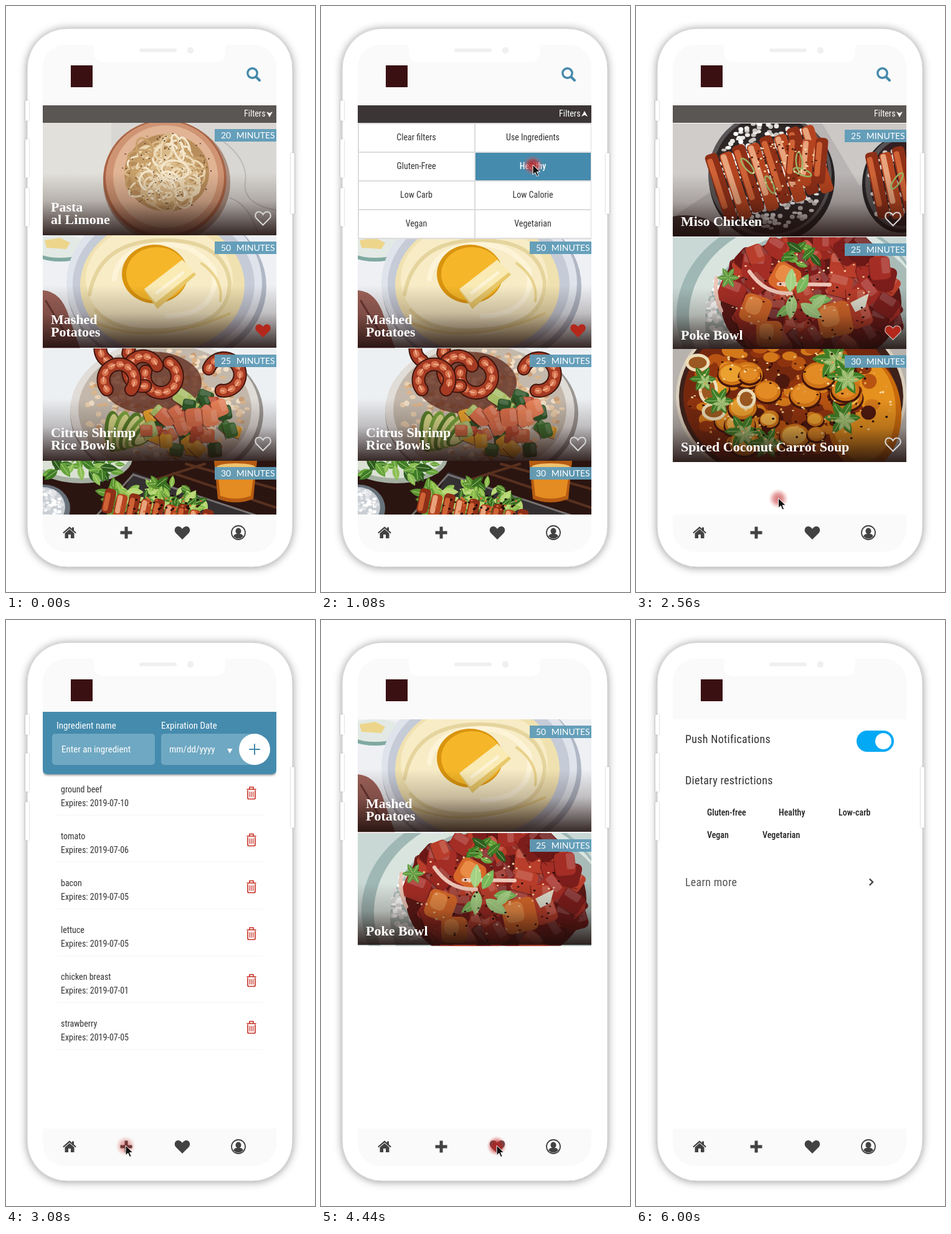
Animation, 496 px wide and 938 px high, one loop 6.32 s. Source, as an HTML page:

```html
<!DOCTYPE html>
<html lang="en">
<head>
<meta charset="utf-8">
<title>Recipe app</title>
<style>
html, body { margin: 0; width: 100%; height: 100%; overflow: hidden; background: #fff; }
svg { display: block; width: 496px; height: 938px; }
text { font: 14px "Roboto Condensed", Roboto, "Liberation Sans Narrow", sans-serif; font-stretch: 75%; fill: #333; }
.title { font: bold 22px "Liberation Serif", Times, serif; fill: #fff; }
.tag { font: 14px Lato, sans-serif; word-spacing: 5px; fill: #fff; }
.mid { text-anchor: middle; }
.white { fill: #fff; }
.field { font-size: 15px; fill: #fff; }
.big { font-size: 18px; letter-spacing: .3px; }
.chip { font-weight: 500; fill: #222; }
</style>
</head>
<body>
<svg id="stage" viewBox="0 0 496 938"></svg>
<script>
const LOOP = 6320, STEP = 40;

// Shape helpers
const el = (x, y, rx, ry, fill, more = '') =>
  `<ellipse cx="${x}" cy="${y}" rx="${rx}" ry="${ry}" fill="${fill}" ${more}/>`;
const box = (x, y, w, h, fill, more = '') =>
  `<rect x="${x}" y="${y}" width="${w}" height="${h}" fill="${fill}" ${more}/>`;
const path = (d, fill, more = '') => `<path d="${d}" fill="${fill}" ${more}/>`;
const line = (d, color, w, more = '') =>
  path(d, 'none', `stroke="${color}" stroke-width="${w}" stroke-linecap="round" ${more}`);
const text = (x, y, s, cls = '', more = '') => `<text x="${x}" y="${y}" class="${cls}" ${more}>${s}</text>`;
const at = (x, y, body, turn = 0) => `<g transform="translate(${x} ${y}) rotate(${turn})">${body}</g>`;
const group = (id, body) => `<g id="${id}">${body}</g>`;

function random(seed) {
  return () => (seed = (seed * 16807) % 2147483647) / 2147483647;
}

// Places n parts at random inside an ellipse.
function scatter(seed, n, cx, cy, rx, ry, draw) {
  const rnd = random(seed * 7919);
  let out = '';
  for (let i = 0; i < n; i++) {
    const a = rnd() * 2 * Math.PI, d = Math.sqrt(rnd());
    out += draw(+(cx + rx * d * Math.cos(a)).toFixed(1), +(cy + ry * d * Math.sin(a)).toFixed(1), rnd);
  }
  return out;
}
const pick = (list, rnd) => list[Math.floor(rnd() * list.length)];
const dots = (seed, n, cx, cy, rx, ry, colors, size) =>
  scatter(seed, n, cx, cy, rx, ry, (x, y, r) => el(x, y, size, size * (.5 + r() / 2), pick(colors, r)));
const cubes = (seed, n, cx, cy, rx, ry, colors, size) =>
  scatter(seed, n, cx, cy, rx, ry, (x, y, r) => {
    const s = size * (.7 + r() * .5);
    return at(x, y, box(-s / 2, -s / 2, s, s * .9, pick(colors, r), `rx="${s / 5}"`) +
      box(-s / 2 + 2, -s / 2 + 1, s * .7, s * .35, '#fff', 'rx="3" opacity=".16"') +
      line(`M${-s / 2} ${s * .42}H${s / 2}`, '#40100c', 1.5, 'opacity=".5"'), Math.floor(r() * 90));
  });
const leaf = (x, y, len, turn, fill) =>
  at(x, y, path(`M0 0Q${len * .4} ${-len * .45} ${len} 0Q${len * .4} ${len * .45} 0 0`, fill) +
    line(`M2 0H${len * .8}`, '#d3e5a8', .7), turn);
const sprig = (x, y, len, fill) => {
  let out = '';
  for (let a = 0; a < 360; a += 60) out += leaf(x, y, len, a, fill);
  return out;
};
const leaves = (seed, n, cx, cy, rx, ry, len, colors) =>
  scatter(seed, n, cx, cy, rx, ry, (x, y, r) => leaf(x, y, len * (.6 + r() * .6), Math.floor(r() * 360), pick(colors, r)));
const shrimp = (x, y, r, turn) => {
  const d = `M${r} 0A${r} ${r} 0 1 1 ${-r * .2} ${r}`;
  return at(x, y, line(d, '#3f150e', 22) + line(d, '#a63a23', 18) +
    line(d, '#d8754f', 10, 'stroke-dasharray="2 12"') + line(d, '#efb394', 2, 'stroke-dasharray="7 7"'), turn);
};
const strips = (x, y, n, w, h, turn) => {
  let out = '';
  for (let i = 0; i < n; i++) {
    const sx = (i - n / 2) * w;
    out += box(sx, -h / 2 + (i % 2) * 5, w - 2, h, i % 2 ? '#b4441f' : '#8e2f17', 'rx="6"') +
      box(sx + 2, -h / 2 + 7, w * .4, h * .75, i % 2 ? '#e8a37c' : '#cf6336', 'rx="4"');
  }
  return at(x, y, out, turn);
};

// Food pictures, each 375 by 180
const greens = ['#3f7d26', '#65a33a', '#2d5c20', '#8cbf55'];
const food = {};

food.pasta = box(0, 0, 375, 181, '#d9d7d3') + box(0, 0, 110, 181, '#e2e0da') +
  line('M290 30Q330 60 325 95T375 140M300 120Q330 130 345 175', '#a9a8a8', 2, 'opacity=".6"') +
  el(199, 95, 102, 97, '#7d4a33', 'opacity=".5"') + el(196, 90, 99, 95, '#a96445') + el(196, 88, 95, 91, '#cf9473') +
  el(197, 86, 84, 82, '#e0b494') + el(199, 80, 68, 62, '#b98d5b') +
  scatter(3, 105, 199, 79, 53, 48, (x, y, r) =>
    el(x, y, 8 + r() * 17, 5 + r() * 11, 'none',
      `stroke="${pick(['#ecd8b4', '#d9b989', '#f4e7cd', '#c7a06a'], r)}" stroke-width="3.2" transform="rotate(${Math.floor(r() * 180)} ${x} ${y})"`)) +
  dots(5, 80, 199, 79, 75, 66, ['#4b3526', '#6b4c31'], 1.2);

food.mash = box(0, 0, 375, 181, '#eef0f4') + el(28, 22, 48, 20, '#7fa9a1') + el(28, 18, 46, 18, '#e3eae5') +
  path('M3 8L28 4L44 12L38 22L6 20Z', '#edd58b') + path('M0 88Q30 90 42 130L60 181H0Z', '#9d6259') +
  line('M5 105L38 160', '#6a3632', 3) +
  el(199, 82, 160, 132, '#b0b7c5') + el(195, 76, 157, 130, '#dfe3eb') + el(194, 78, 146, 119, '#c5cbd7') +
  el(192, 80, 132, 108, '#f0e1b0') + el(187, 70, 118, 90, '#f7ecc6') +
  line('M75 95Q90 10 190 8T300 75Q300 140 210 150T85 120', '#e2cf94', 6, 'opacity=".8"') +
  line('M115 70Q120 25 180 16T275 55Q285 125 200 130', '#fff7de', 8, 'opacity=".8"') +
  line('M85 140Q180 180 300 125M255 45Q290 70 285 105', '#e5cb7d', 4, 'opacity=".8"') +
  el(180, 62, 53, 47, '#d9940f') + el(183, 62, 49, 43, '#f5b729') +
  path('M163 88L224 40L246 63L184 118Z', '#e8c869') + path('M163 86L224 39L243 59L181 108Z', '#faeab4') +
  line('M183 92L225 60', '#fff9e5', 5, 'opacity=".7"');

const slice = i => at(112 + i * 14, 133,
  el(0, 0, 13, 33, i % 2 ? '#78a63c' : '#557f29') + el(2, 0, 9, 28, '#d9dc8b'), i * 12);
food.bowl = box(0, 0, 375, 181, '#edf0f3') + el(199, 104, 155, 116, '#9b9793') + el(196, 100, 152, 114, '#e0dcd7') +
  el(196, 98, 139, 104, '#c3b8ab') +
  dots(11, 420, 196, 94, 132, 92, ['#e9cfae', '#f1dfc7', '#c99e78', '#dcb48b'], 4.6) +
  el(175, 55, 80, 50, '#5b2517', 'opacity=".75"') + [0, 1, 2, 3, 4].map(slice).join('') +
  cubes(13, 44, 240, 122, 78, 46, ['#d36a42', '#bd4a30', '#e8a22c', '#3d7030', '#2d5528', '#a8bd66'], 22) +
  cubes(15, 9, 240, 105, 56, 25, ['#d96e4b', '#e78157'], 27) +
  shrimp(125, 28, 23, 200) + shrimp(179, 14, 26, 20) + shrimp(187, 52, 24, 160) +
  shrimp(122, 82, 25, 220) + shrimp(262, 58, 26, 280);

food.wrap = box(0, 0, 375, 181, '#2b1511') +
  line('M210 20L375 75M230 5L375 45M150 40L260 5', '#57301f', 4) +
  path('M65 181L145 18L375 100V181Z', '#343032') + line('M80 95L145 22L375 98', '#777272', 3) +
  el(62, -4, 82, 40, '#a4afa2') + el(62, -8, 77, 36, '#dbe1d4') +
  leaves(17, 60, 66, 2, 58, 22, 24, greens) +
  el(2, 76, 42, 38, '#67717a') + el(0, 74, 36, 32, '#c9ced4') + dots(18, 130, 0, 72, 32, 29, ['#fff', '#e1e3e6'], 3) +
  leaves(19, 100, 185, 62, 80, 26, 24, ['#8abd48', '#5c9430', '#b6d672', '#38701f']) +
  strips(195, 83, 10, 20, 40, 12) + dots(20, 60, 195, 75, 70, 20, ['#1f0b07', '#d86a37'], 2) +
  path('M275 0H344L338 61Q310 72 281 61Z', '#b55b13') + path('M280 12H340L334 56Q310 65 285 56Z', '#e48b22') +
  el(310, 10, 31, 6, '#f1c26d');

const onion = (x, y, turn) => at(x, y, el(0, 0, 15, 5, 'none', 'stroke="#9ab565" stroke-width="2.5"'), turn);
food.miso = box(0, 0, 375, 182, '#b9b5b4') + path('M0 0H95L60 110L0 150Z', '#cfccca') +
  path('M240 0H375V40L300 100Z', '#cbc8c6') + el(20, 175, 55, 28, '#443634') +
  el(159, 88, 101, 103, '#242224') + el(156, 82, 99, 100, '#5a5657') + el(157, 82, 93, 95, '#2d2627') +
  dots(23, 360, 157, 82, 88, 88, ['#e9e7e3', '#c8c3bf', '#fff'], 4) +
  strips(155, 77, 8, 23, 112, -18) + strips(216, 58, 3, 22, 74, 5) +
  el(366, 98, 62, 77, '#242224') + el(367, 95, 58, 74, '#575355') + el(369, 95, 52, 69, '#332022') +
  dots(24, 80, 350, 100, 36, 58, ['#e9e7e3', '#c8c3bf'], 4) + strips(362, 92, 4, 22, 108, -12) +
  onion(120, 68, 50) + onion(156, 98, 65) + onion(203, 62, 85) + onion(208, 78, 20) + onion(360, 92, -55) +
  dots(25, 70, 175, 73, 60, 45, ['#f2d5a4', '#541c0e'], 1.8);

const salmon = (x, y, s, turn) => at(x, y, box(-s / 2, -s / 2, s, s, '#d76829', 'rx="10"') +
  box(-s / 2 + 5, -s / 2 + 4, s * .55, s * .6, '#ef9850', 'rx="9" opacity=".75"'), turn);
food.poke = box(0, 0, 375, 181, '#c9d8d5') + el(205, 125, 199, 165, '#9fb8b5') + el(214, 127, 188, 158, '#d9e4df') +
  el(230, 135, 178, 146, '#a9bbb7') + dots(30, 160, 90, 115, 36, 55, ['#fff', '#dcdedb'], 4) +
  el(222, 105, 145, 108, '#5b1815') +
  cubes(31, 120, 224, 94, 140, 96, ['#97281f', '#7c1d1b', '#b83d2a', '#6b1817', '#a42d25'], 39) +
  salmon(133, 116, 46, 20) + salmon(180, 65, 44, 30) + salmon(260, 132, 54, -12) + salmon(155, 155, 42, 0) +
  line('M123 55Q148 92 190 90M170 75L252 76M70 65Q66 95 78 118', '#ecc5b6', 6) +
  path('M285 105L315 90L309 112L293 120Z', '#dfe2d3') +
  leaves(32, 13, 202, 26, 28, 18, 25, greens) + leaf(188, 88, 39, -85, '#a4d285') + leaf(200, 90, 36, -60, '#79b85c') +
  leaf(194, 108, 34, 145, '#79b85c') + leaf(205, 106, 42, 35, '#a4d285') + leaf(218, 100, 38, 0, '#79b85c') +
  leaf(222, 116, 34, -45, '#a4d285') + leaf(192, 92, 40, 95, '#a4d285') +
  sprig(89, 65, 18, '#5e993e') + dots(33, 85, 210, 95, 120, 78, ['#260d0b', '#f1d0a1'], 1.8);

const ring = (x, y, rx, ry) => el(x, y, rx, ry, '#9b5820') + el(x, y, rx, ry, 'none', 'stroke="#ecddb8" stroke-width="5"');
const herb = (x, y, len) => sprig(x, y, len, '#3f7d26') + sprig(x + 4, y + 5, len * .6, '#97b86b');
food.soup = box(0, 0, 375, 181, '#b7b2ad') + el(190, 76, 185, 145, '#d9cfbd') + el(190, 76, 180, 140, '#3e211a') +
  el(187, 76, 170, 132, '#76280f') + el(307, 104, 60, 90, '#c96a0c') + el(306, 98, 52, 82, '#e5911e') +
  dots(40, 130, 175, 75, 148, 100, ['#8f330e', '#b85412', '#4d180d', '#d2781a'], 12) +
  scatter(41, 28, 165, 78, 125, 82, (x, y, r) => {
    const s = 13 + r() * 14;
    return el(x, y + 3, s + 2, s * .85, '#45150b') + el(x, y, s, s * .82, '#cf7417') +
      el(x - 1, y - 1, s * .82, s * .62, pick(['#eaa12f', '#f1b449', '#e28b25'], r));
  }) +
  ring(57, 65, 13, 20) + ring(40, 22, 17, 12) + ring(118, 80, 13, 14) + ring(66, 100, 17, 12) +
  herb(258, 16, 35) + herb(277, 44, 32) + herb(272, 110, 30) + herb(74, 83, 24) + herb(112, 132, 30) +
  herb(150, 150, 28) + herb(48, 48, 22) +
  dots(43, 170, 190, 82, 165, 88, ['#f3d69b', '#260d08', '#e6a14b'], 2);

// Screens
const heartPath = 'M0 10.5L-10.5 0C-14 -4 -12 -10.5 -6.5 -10.5C-3 -10.5 -1 -8 0 -6.2C1 -8 3 -10.5 6.5 -10.5C12 -10.5 14 -4 10.5 0Z';
const heart = (x, y, fill, more = '') => at(x, y, path(heartPath, fill, more));
const trash = y => at(394, y,
  line('M-7 -6H7M-3 -7V-9.5H3V-7M-6 -4V8Q-6 9.5 -4 9.5H4Q6 9.5 6 8V-4', '#c62d22', 1.6) +
  line('M-2.8 -2V6M0 -2V6M2.8 -2V6', '#c62d22', 1.2));
const tag = (y, mins) => box(335, y, 99, 20, '#5f9cb9', 'opacity=".95"') + text(345, y + 15, mins + ' MINUTES', 'tag');

function card(name, y, titles, mins, fav, h = 180) {
  const n = titles.length;
  let out = `<use href="#${name}" x="59" y="${y}"/>` + box(59, y + 80, 375, h - 80, 'url(#fade)') + tag(y + 10, mins);
  titles.forEach((t, i) => out += text(72, y + 164 - (n - 1 - i) * 20 - (n > 1 ? 2 : 0), t, 'title'));
  const full = heart(412.5, y + 153, '#b3281b');
  if (fav === 'red') return out + full;
  if (fav) out += heart(412.5, y + 153, 'none', 'stroke="#d5d5d5" stroke-width="2"');
  return out + (fav === 'toggle' ? group('liked', full) : '');
}

const options = ['Clear filters', 'Use Ingredients', 'Gluten-Free', 'Healthy', 'Low Carb', 'Low Calorie', 'Vegan', 'Vegetarian'];
const menu = box(59, 187, 375, 186, '#dcdcdc') + options.map((s, i) => {
  const x = 61 + (i % 2) * 187, y = 189 + (i >> 1) * 46;
  return box(x, y, 185, 44, '#fff', `id="cell${i}"`) + text(x + 92, y + 26, s, 'mid', `id="label${i}"`);
}).join('');

const home = group('all',
    card('pasta', 187, ['Pasta', 'al Limone'], 20, 'empty') +
    card('mash', 367, ['Mashed', 'Potatoes'], 50, 'red') +
    card('bowl', 548, ['Citrus Shrimp', 'Rice Bowls'], 25, 'empty') +
    '<use href="#wrap" x="59" y="728"/>' + tag(738, 30)) +
  group('some',
    card('miso', 188, ['Miso Chicken'], 25, 'empty', 181) +
    card('poke', 370, ['Poke Bowl'], 25, 'toggle', 179) +
    card('soup', 549, ['Spiced Coconut Carrot Soup'], 30, 'empty', 181)) +
  group('menu', menu) +
  box(59, 159, 375, 28, '#5a5654', 'id="bar"') + text(382, 177, 'Filters', 'white') +
  path('M418 169L423 171.5L428 169L423 178Z', '#fff', 'id="arrow"') +
  at(397, 109, el(-1.5, -1.5, 7.7, 7.7, 'none', 'stroke="#4589ab" stroke-width="3.4"') + line('M5 5L10 10', '#4589ab', 4));

const stock = ['ground beef 10', 'tomato 06', 'bacon 05', 'lettuce 05', 'chicken breast 01', 'strawberry 05'];
const pantry = box(59, 147, 375, 667, '#fff') +
  path('M59 147H434V239Q434 247 426 247H67Q59 247 59 239Z', '#458bad', 'filter="url(#drop)"') +
  text(81, 174, 'Ingredient name', 'field') + text(249, 174, 'Expiration Date', 'field') +
  box(74, 182, 165, 50, '#6fa8c2', 'rx="5"') + box(249, 182, 160, 50, '#6fa8c2', 'rx="5"') +
  text(89, 212, 'Enter an ingredient', 'field') + text(262, 212, 'mm/dd/yyyy', 'field') +
  path('M355 206H363.5L359.2 213.5Z', '#fff') + el(399, 207, 25, 25, '#fff') + line('M391 207H407M399 199V215', '#4589ab', 2) +
  stock.map((s, i) => {
    const y = 276 + i * 75;
    return text(88, y, s.slice(0, -3)) + text(88, y + 22, 'Expires: 2019-07-' + s.slice(-2)) +
      trash(y + 1) + box(81, y + 36, 331, 1, '#f5f5f5');
  }).join('');

const saved = card('mash', 159, ['Mashed', 'Potatoes'], 50) + card('poke', 341, ['Poke Bowl'], 25, '', 179);

const settings = text(79, 197, 'Push Notifications', 'big') + box(354, 177, 60, 34, '#03a9f4', 'rx="17"') + el(397, 194, 13, 13, '#fff') +
  text(79, 263, 'Dietary restrictions', 'big') +
  text(114, 313, 'Gluten-free', 'chip') + text(229, 313, 'Healthy', 'chip') + text(325, 313, 'Low-carb', 'chip') +
  text(114, 349, 'Vegan', 'chip') + text(203, 349, 'Vegetarian', 'chip') +
  text(79, 426, 'Learn more', 'big', 'style="fill:#555"') + line('M375.5 415L380 419.5L375.5 424', '#444', 2.4);

const ink = '#424242';
const nav = box(59, 814, 375, 60, '#fafafa') +
  at(102, 843, path('M-7.5 1L0 -5.5L7.5 1V9H2V3H-2V9H-7.5Z', ink) + line('M-9.5 0L0 -8.2L9.5 0', ink, 2.2) + box(4, -8.5, 3, 6, ink)) +
  path('M183.5 840.5H190.5V833.5H195.5V840.5H202.5V845.5H195.5V852.5H190.5V845.5H183.5Z', ink) + heart(283, 843.5, ink) +
  at(373, 843, el(0, 0, 11, 11, 'none', `stroke="${ink}" stroke-width="1.8"`) + el(0, -2.5, 4.5, 5, ink) +
    path('M-8 6Q-6 2 -3 2H3Q6 2 8 6Q0 13 -8 6Z', ink));

const key = (x, y, h) => box(x, y, 6, h, '#fff', 'rx="2" filter="url(#edge)"');
const shell = box(34, 36, 426, 862, '#fff', 'rx="64" filter="url(#halo)"') +
  key(31, 151, 33) + key(31, 213, 62) + key(31, 291, 62) + key(457, 235, 98) +
  box(34, 36, 426, 862, 'none', 'rx="64" stroke="#d0d0d0"') +
  box(33, 152, 4, 31, '#fff') + box(33, 214, 4, 60, '#fff') + box(33, 292, 4, 60, '#fff') + box(457, 236, 4, 96, '#fff');

const foods = Object.entries(food).map(([id, art]) =>
  `<g id="${id}" clip-path="url(#${id === 'wrap' ? 'short' : 'photo'})">${art}</g>`).join('');

const stop = (at, color, alpha) => `<stop offset="${at}" stop-color="${color}" stop-opacity="${alpha}"/>`;
const defs = `<defs>
  <linearGradient id="fade" x2="0" y2="1">${stop(0, '#1c0c0a', 0) + stop(.45, '#1c0c0a', .22) + stop(1, '#1c0c0a', .88)}</linearGradient>
  <radialGradient id="glowFill">${stop(0, '#b71c1c', .95) + stop(.5, '#c62828', .65) + stop(1, '#e57373', 0)}</radialGradient>
  <filter id="halo" x="-20%" y="-20%" width="140%" height="140%"><feDropShadow dx="0" dy="1" stdDeviation="7" flood-opacity=".42"/></filter>
  <filter id="edge" x="-200%" width="500%"><feDropShadow dx="0" dy="0" stdDeviation="1.2" flood-opacity=".3"/></filter>
  <filter id="drop"><feDropShadow dx="0" dy="2" stdDeviation="1.5" flood-opacity=".35"/></filter>
  <clipPath id="photo">${box(0, 0, 375, 180.5, '#000')}</clipPath>
  <clipPath id="short">${box(0, 0, 375, 86, '#000')}</clipPath>
  <clipPath id="screen">${box(59, 62, 375, 812, '#000', 'rx="36"')}</clipPath>${foods}</defs>`;

const $ = id => document.getElementById(id);
$('stage').innerHTML = defs + shell + '<g clip-path="url(#screen)">' + box(59, 62, 375, 97, '#fafafa') +
  box(104, 95, 35, 35, '#3a1013') +
  group('home', home) + group('pantry', pantry) + group('saved', saved) + group('settings', settings) + nav + '</g>' +
  path('M136 61Q141 61 141 66V72Q141 90 159 90H334Q352 90 352 72V66Q352 61 357 61Z', '#fff') +
  box(214, 68, 60, 6, '#f0f0f0', 'rx="3"') + el(296, 71, 5.3, 5.3, '#f0f0f0') +
  group('pointer', el(0, 1, 16, 16, 'url(#glowFill)', 'id="glow"') +
    path('M0 0V16L3.8 12.4L6.6 18.6L9.2 17.5L6.5 11.5H11.7Z', '#111', 'stroke="#fff"'));

// Pointer stops: time, x, y
const track = [
  [80, 260, 450], [400, 414, 169], [680, 414, 169], [1000, 340, 254], [1360, 340, 254],
  [1440, 414, 169], [1560, 414, 169], [1720, 332, 452], [1920, 411, 521], [2160, 411, 521],
  [2640, 192, 841], [3480, 192, 841], [3760, 282, 841], [4640, 282, 841], [5040, 372, 841],
  [5640, 372, 841], [5920, 378, 852]
];
// Click glows: start, full, hold until, gone
const clicks = [
  [400, 480, 480, 680], [1000, 1080, 1080, 1280], [1400, 1480, 1480, 1560], [1920, 2000, 2000, 2160],
  [2480, 2600, 2960, 3200], [3960, 4000, 4640, 4760], [5040, 5160, 5400, 5640]
];

const ramp = (t, a, b) => Math.min(1, Math.max(0, (t - a) / (b - a)));

function place(t) {
  const i = track.findIndex(p => p[0] > t);
  if (i < 1) return i ? track[track.length - 1] : track[0];
  const a = track[i - 1], b = track[i], u = ramp(t, a[0], b[0]);
  return a.map((v, k) => v + (b[k] - v) * u);
}

const show = (id, on) => $(id).style.display = on ? '' : 'none';
const within = (t, a, b) => t >= a && t < b;

function draw(t) {
  show('home', t < 2760);
  show('pantry', within(t, 2760, 4240));
  show('saved', within(t, 4240, 5400));
  show('settings', t >= 5400);
  const open = within(t, 440, 1520), filtered = t >= 1120;
  show('menu', open);
  show('all', !filtered);
  show('some', filtered);
  show('liked', t >= 2000);
  $('bar').setAttribute('fill', within(t, 400, 2000) ? '#3b3635' : '#5a5654');
  $('arrow').setAttribute('transform', open ? 'rotate(180 423 173)' : '');
  const chosen = t < 1080 ? 0 : 3;
  for (const i of [0, 3]) {
    $('cell' + i).setAttribute('fill', i === chosen ? '#458bad' : '#fff');
    $('label' + i).style.cssText = i === chosen ? 'fill:#fff;font-weight:500' : '';
  }
  const [, x, y] = place(t);
  const glow = Math.max(...clicks.map(([a, b, c, d]) => ramp(t, a, b) * (1 - ramp(t, c, d))));
  $('pointer').setAttribute('transform', `translate(${x} ${y})`);
  $('pointer').setAttribute('opacity', ramp(t, 40, 120) * (1 - ramp(t, 5640, 5920)));
  $('glow').setAttribute('opacity', glow);
}

const start = performance.now();
function tick() {
  const t = (performance.now() - start) % LOOP;
  draw(Math.floor(t / STEP) * STEP);
  requestAnimationFrame(tick);
}
draw(0);
requestAnimationFrame(tick);
</script>
</body>
</html>
```
